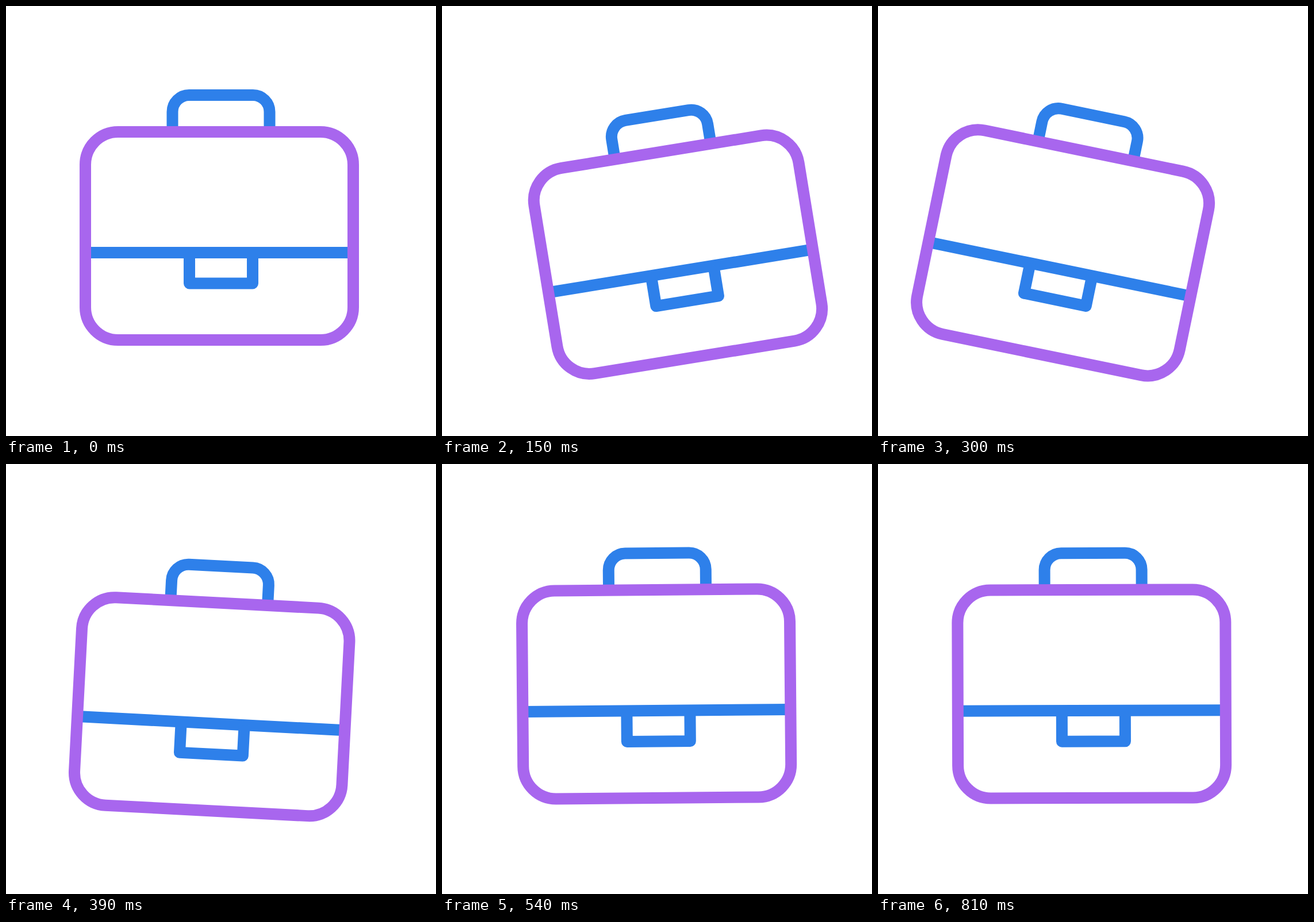
An HTML page for the animation above (2840 ms loop, 748 px wide and 748 px high).

```html
<!DOCTYPE html>
<html lang="en">
<head>
<meta charset="utf-8">
<title>Briefcase</title>
<style>
  html, body { margin: 0; width: 100%; height: 100%; overflow: hidden; background: #fff; }
  svg { display: block; width: 100%; height: 100%; }
</style>
</head>
<body>
<svg viewBox="0 0 748 748">
  <g id="case" fill="none" stroke="#2e80ea" stroke-width="20">
    <path d="M289.5 219V184a29 29 0 0 1 29-29H429.5a29 29 0 0 1 29 29V219"/>
    <path d="M138 429H604"/>
    <path d="M319 429V482.5H429V429" stroke-linejoin="round"/>
    <rect x="138" y="219" width="466" height="362" rx="57" stroke="#a866ee"/>
  </g>
</svg>
<script>
  const LOOP = 2840, STEP = 30, SETTLED = 810;
  const PIVOT = { x: 374, y: 155 };

  // Keys are [time in ms, value].
  const SWING = [[0, 0], [151, -9.25], [280, 12.1], [476, -3.3], [600, 2.05], [720, -1.1], [840, 0]];
  const DROP = [[0, 0], [120, 35], [330, 35], [480, 0]];

  const ease = x => x * x * (3 - 2 * x);

  function valueAt(keys, time) {
    const next = keys.findIndex(key => key[0] > time);
    if (next < 0) return keys[keys.length - 1][1];
    const [t0, v0] = keys[next - 1];
    const [t1, v1] = keys[next];
    return v0 + (v1 - v0) * ease((time - t0) / (t1 - t0));
  }

  const briefcase = document.getElementById('case');

  function draw(elapsed) {
    const time = Math.min(SETTLED, Math.floor((elapsed % LOOP) / STEP) * STEP);
    const angle = valueAt(SWING, time);
    const drop = valueAt(DROP, time);
    briefcase.setAttribute('transform',
      `translate(0 ${drop}) rotate(${angle} ${PIVOT.x} ${PIVOT.y})`);
  }

  let start;
  function tick(now) {
    start ??= now;
    draw(now - start);
    requestAnimationFrame(tick);
  }
  draw(0);
  requestAnimationFrame(tick);
</script>
</body>
</html>
```
